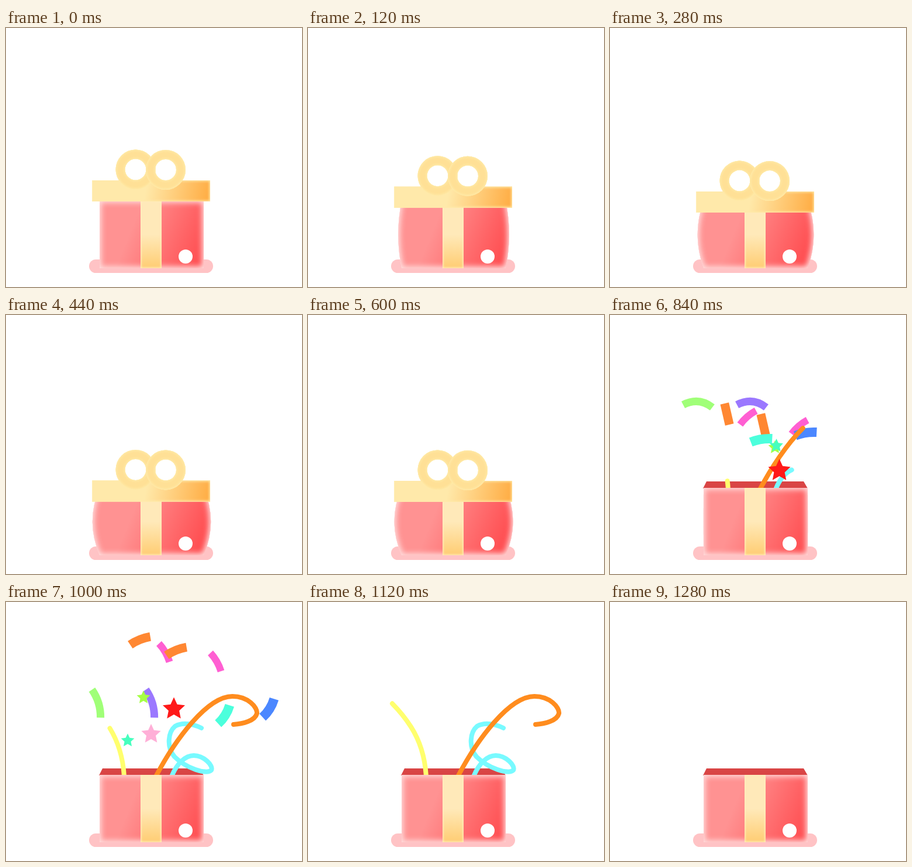
Write an HTML page with a canvas that moves like this. It is 506 px wide and 442 px high and loops after 1.56 s.

```html
<!DOCTYPE html>
<html lang="en">
<head>
<meta charset="utf-8">
<title>Gift box</title>
<style>
  html, body { margin: 0; width: 100%; height: 100%; overflow: hidden; background: #fff; }
  canvas { display: block; }
</style>
</head>
<body>
<canvas id="stage" width="506" height="442"></canvas>
<script>
const ctx = document.getElementById('stage').getContext('2d');
const LOOP = 1560, STEP = 40, POP = 640, BURST = 680, BEAT = 160;
const BOX = { left: 160, right: 338, top: 295, bottom: 410 };

// Each motion holds three poses [x, y, degrees, bend], one beat apart,
// and is used by two pieces, the second one shifted.
const confetti = [
  { length: 50, width: 13, colors: ['#a0ff78', '#9b78ff'], shift: [92, 0],
    poses: [[222, 254, 98, -5], [150, 155.5, 5, -8], [154.3, 173.5, 73, -4]] },
  { length: 36, width: 12, colors: ['#ff5fd2', '#ff5fd2'], shift: [88, 16],
    poses: [[225, 256, 66, 0], [236, 175, -41, -2], [270.5, 86.5, 60, -2]] },
  { length: 37, width: 15, colors: ['#ff8732', '#ff8732'], shift: [62, 18],
    poses: [[188, 264, 122, -1], [200, 169, 77, 0], [229.5, 66, -22, -2]] },
  { length: 37, width: 16, colors: ['#4b87ff', '#4bffdc'], shift: [-76, 11],
    poses: [[273.5, 270.5, 100, 2], [335, 203, -9, -2], [448.5, 181, 122, -2.5]] }
];

const streamers = [
  { color: '#ffff6e', start: 807, speed: 0.45,
    path: 'M202 298C200 262 190 235 176 213S139 165 116 150' },
  { color: '#78faff', start: 809, speed: 1.44,
    path: 'M283 298C292 275 307 262 321 262C338 262 355 279 351 287C343 295 308 284 288 264C274 248 277 222 289 212C302 205 319 208 334 215' },
  { color: '#ff8c1e', start: 721, speed: 1.08,
    path: 'M256 298C289 235 344 161 387 161C414 161 430 180 429 190C426 203 404 208 389 209' }
].map(s => ({ ...s, path: new Path2D(s.path) }));

const stars = [
  { color: '#ffafd7', radius: 17.5, from: 880, points: [[330, 330], [285, 268], [248, 225.5]] },
  { color: '#a5ff46', radius: 12, from: 800, points: [[320, 300], [282, 226], [235, 163]] },
  { color: '#46ffbe', radius: 12, from: 800, points: [[345, 270], [284.5, 223], [208, 236.5]] },
  { color: '#ff1919', radius: 20, from: 680, points: [[394, 309], [289.5, 265.5], [287, 182.5]] }
];

const clamp = (v, lo = 0, hi = 1) => Math.min(hi, Math.max(lo, v));

// Smooth curve through the values a, b, c at p = 0, 1, 2.
const through = (p, a, b, c) => a + p * (b - a) + p * (p - 1) / 2 * (c - 2 * b + a);
const poseAt = (p, [a, b, c]) => a.map((v, i) => through(p, v, b[i], c[i]));

function gradient(x0, y0, x1, y1, ...stops) {
  const g = ctx.createLinearGradient(x0, y0, x1, y1);
  stops.forEach(([at, color]) => g.addColorStop(at, color));
  return g;
}

function rectPath(x, y, w, h) {
  const path = new Path2D();
  path.rect(x, y, w, h);
  return path;
}

// Fills a shape, then lets the blurred shadow of its surroundings fall inside.
function glowing(shape, fill, glow, blur) {
  const around = rectPath(-100, -100, 706, 642);
  around.addPath(shape);
  ctx.save();
  ctx.fillStyle = fill;
  ctx.fill(shape, 'evenodd');
  ctx.clip(shape, 'evenodd');
  ctx.fillStyle = ctx.shadowColor = glow;
  ctx.shadowBlur = blur;
  ctx.fill(around, 'evenodd');
  ctx.fill(around, 'evenodd');
  ctx.restore();
}

function drawBack() {
  ctx.fillStyle = '#ffc3c5';
  ctx.beginPath();
  ctx.roundRect(142, 395, 212, 23, 11.5);
  ctx.fill();
  ctx.fillStyle = '#d94545';
  ctx.beginPath();
  ctx.moveTo(165, 284);
  ctx.lineTo(331, 284);
  ctx.lineTo(338, 296);
  ctx.lineTo(159, 296);
  ctx.fill();
}

function drawFront(bulge) {
  const { left, right, top, bottom } = BOX, middle = (top + bottom) / 2;
  const body = new Path2D();
  body.moveTo(left, top);
  body.lineTo(right, top);
  body.quadraticCurveTo(right + 2 * bulge, middle, right, bottom);
  body.lineTo(left, bottom);
  body.quadraticCurveTo(left - 2 * bulge, middle, left, top);
  body.closePath();
  glowing(body, gradient(220, 330, 336, 378, [0, '#ff9292'], [1, '#ff5053']), '#ffdcdc', 12);
  glowing(rectPath(230, 295, 36, 115),
    gradient(0, 295, 0, 410, [0, '#ffe9b9'], [0.5, '#ffe9b9'], [1, '#ffcd73']), '#fff0be', 4);
  ctx.fillStyle = '#fff';
  ctx.beginPath();
  ctx.arc(307, 390, 12, 0, 2 * Math.PI);
  ctx.fill();
}

function drawRing(x, y) {
  const ring = new Path2D();
  ring.arc(x, y, 34, 0, 2 * Math.PI);
  ring.moveTo(x + 18, y);
  ring.arc(x, y, 18, 0, 2 * Math.PI);
  glowing(ring, '#ffe096', '#ffebaa', 5);
}

function drawLid(drop) {
  ctx.save();
  ctx.translate(0, drop);
  glowing(rectPath(147.5, 260, 201.5, 36),
    gradient(240, 270, 345, 288, [0, '#ffe9aa'], [1, '#ffae46']), '#ffebaa', 5);
  drawRing(221.5, 241.5);
  drawRing(273, 242);
  ctx.restore();
}

function drawPiece([x, y, degrees, bend], length, width, color) {
  ctx.save();
  ctx.translate(x, y);
  ctx.rotate(degrees * Math.PI / 180);
  ctx.strokeStyle = color;
  ctx.lineWidth = width;
  ctx.beginPath();
  ctx.moveTo(-length / 2, 0);
  ctx.quadraticCurveTo(0, 2 * bend, length / 2, 0);
  ctx.stroke();
  ctx.restore();
}

function drawConfetti(t) {
  const p = Math.min((t - BURST) / BEAT, 2.08);
  for (const { length, width, colors, shift, poses } of confetti) {
    const [x, y, ...rest] = poseAt(p, poses);
    colors.forEach((color, i) =>
      drawPiece([x + i * shift[0], y + i * shift[1], ...rest], length, width, color));
  }
}

function drawStreamers(t) {
  ctx.lineWidth = 8;
  ctx.lineCap = 'round';
  for (const { color, start, speed, path } of streamers) {
    if (t <= start) continue;
    ctx.strokeStyle = color;
    ctx.setLineDash([(t - start) * speed, 2000]);
    ctx.stroke(path);
  }
}

function drawStar(x, y, radius, color) {
  ctx.fillStyle = color;
  ctx.beginPath();
  for (let i = 0; i < 10; i++) {
    const r = i % 2 ? radius * 0.48 : radius, a = (i / 5 - 0.5) * Math.PI;
    ctx.lineTo(x + r * Math.cos(a), y + r * Math.sin(a));
  }
  ctx.fill();
}

function draw(t) {
  ctx.fillStyle = '#fff';
  ctx.fillRect(0, 0, 506, 442);
  const closed = t < POP;
  const press = 1 - Math.pow(1 - clamp(t / 600), 2.8);
  const release = Math.pow(1 - clamp((t - 600) / 310), 3);
  const burstAlpha = 1 - clamp((t - 1040) / 80);

  drawBack();
  if (!closed) {
    ctx.save();
    ctx.beginPath();
    ctx.rect(0, 0, 506, BOX.top);
    ctx.clip();
    ctx.globalAlpha = burstAlpha;
    drawConfetti(t);
    ctx.globalAlpha = 1 - clamp((t - 1120) / 160);
    drawStreamers(Math.min(t, 1160));
    ctx.restore();
  }
  drawFront(12.5 * press * release);
  if (closed) return drawLid(23 * press);

  ctx.globalAlpha = burstAlpha;
  for (const { color, radius, from, points } of stars) {
    if (t < from) continue;
    const [x, y] = poseAt((t - BURST) / BEAT, points);
    drawStar(x, y, radius, color);
  }
  ctx.globalAlpha = 1;
}

const began = performance.now();
function tick() {
  const t = (performance.now() - began) % LOOP;
  draw(Math.floor(t / STEP) * STEP);
  requestAnimationFrame(tick);
}
tick();
</script>
</body>
</html>
```
